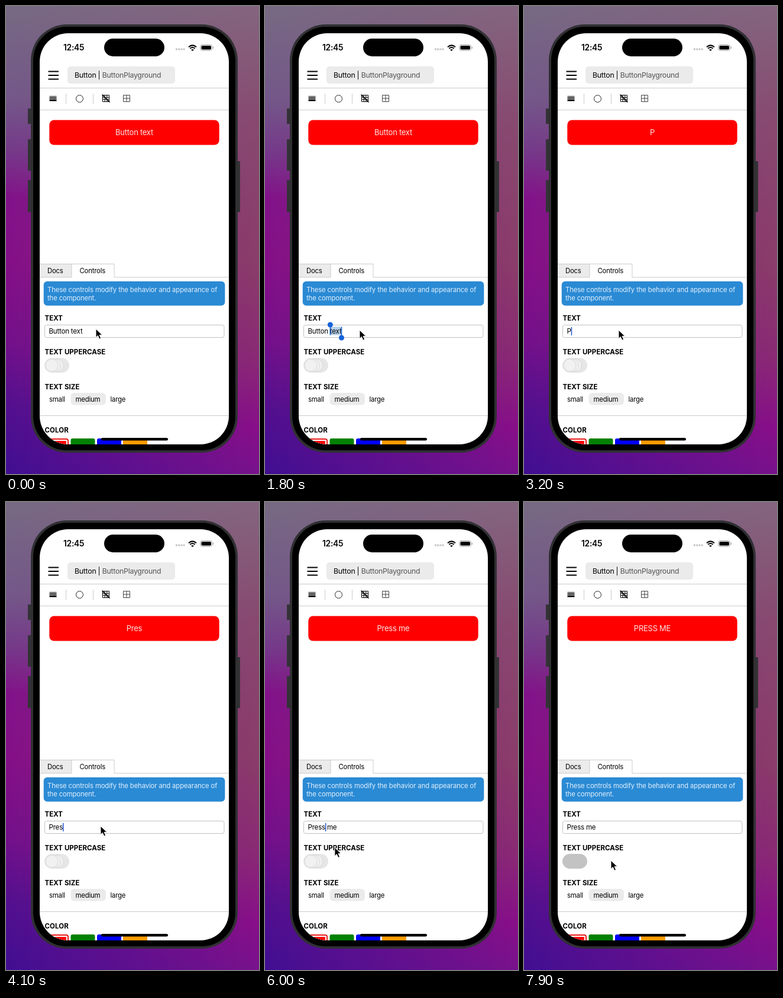
An HTML page for the animation above (8 s loop, 428 by 790 pixels).

```html
<!DOCTYPE html>
<html lang="en">
<head>
<meta charset="utf-8">
<title>Button playground</title>
<style>
  html, body { margin: 0; width: 100%; height: 100%; overflow: hidden; }
  svg { display: block; width: 428px; height: 790px; }
  text { font: 400 11.4px Inter, Roboto, sans-serif; letter-spacing: -.02em; white-space: pre; fill: #000; }
  .label { font-size: 11.5px; font-weight: 700; letter-spacing: .005em; }
  .rule { stroke: #cbcbcb; fill: none; }
  .grey { fill: #ebebeb; }
  .banner { font-size: 11.3px; letter-spacing: -.01em; fill: #e2f0fc; }
  #menu { filter: drop-shadow(0 2px 7px #0002); }
  #menu text { font-size: 12px; text-anchor: middle; }
</style>
</head>
<body>
<svg viewBox="0 0 428 790">
  <defs>
    <linearGradient id="left" x2="0" y2="1">
      <stop offset="0" stop-color="#776a83"/>
      <stop offset=".2" stop-color="#73588a"/>
      <stop offset=".31" stop-color="#75398b"/>
      <stop offset=".41" stop-color="#82128a"/>
      <stop offset=".55" stop-color="#850f88"/>
      <stop offset=".72" stop-color="#73108b"/>
      <stop offset=".86" stop-color="#52108f"/>
      <stop offset="1" stop-color="#410f92"/>
    </linearGradient>
    <linearGradient id="right" x2="0" y2="1">
      <stop offset="0" stop-color="#84657f"/>
      <stop offset=".25" stop-color="#88496f"/>
      <stop offset=".55" stop-color="#8a3d69"/>
      <stop offset=".75" stop-color="#8a2a74"/>
      <stop offset=".9" stop-color="#880f88"/>
      <stop offset="1" stop-color="#78128c"/>
    </linearGradient>
    <linearGradient id="fade"><stop stop-color="#000"/><stop offset="1" stop-color="#fff"/></linearGradient>
    <mask id="across"><rect width="428" height="790" fill="url(#fade)"/></mask>
    <linearGradient id="glass" x2="0" y2="1">
      <stop stop-color="#dbe6f0"/><stop offset=".4" stop-color="#e8ecf1"/><stop offset="1" stop-color="#f1f2f4"/>
    </linearGradient>
    <clipPath id="screen"><rect x="57" y="46" width="320" height="694" rx="48"/></clipPath>
  </defs>

  <rect width="428" height="790" fill="url(#left)"/>
  <rect width="428" height="790" fill="url(#right)" mask="url(#across)"/>

  <!-- phone -->
  <path d="M39.5 173v26M39.5 225v53M39.5 294v54M393.5 262v86" stroke="#333336" stroke-width="5"/>
  <rect x="42" y="31" width="350" height="723" rx="61" fill="#303033"/>
  <rect x="46" y="35" width="342" height="715" rx="57" fill="#000"/>

  <g clip-path="url(#screen)">
    <rect x="57" y="46" width="320" height="694" fill="#fff"/>

    <!-- status bar -->
    <text x="97" y="75" style="font-size:13.8px;font-weight:600">12:45</text>
    <rect x="166" y="55" width="102" height="30" rx="15"/>
    <path d="M287 73h15.500" stroke="#c4c4c4" stroke-width="3" stroke-dasharray="3 1.2"/>
    <path d="M309 69.200q6.500-5.600 13 0M311.300 71.800q4.200-3.500 8.400 0" fill="none" stroke="#000" stroke-width="2"/>
    <path d="M313 73.700q2.500-1.600 5 0l-2.500 2.300z"/>
    <rect x="329" y="65.500" width="19.500" height="9.500" rx="3" fill="#fff" stroke="#999"/>
    <rect x="330.500" y="67" width="16.500" height="6.500" rx="1.800"/>
    <path d="M350.500 68.500v3.500" stroke="#999"/>

    <!-- header -->
    <path d="M71.500 110.500h17.500M71.500 117h17.500M71.500 123.500h17.500" stroke="#000" stroke-width="2.200"/>
    <rect class="grey" x="104" y="102" width="182" height="29" rx="5"/>
    <text x="116" y="121" style="font-size:12.3px">Button | <tspan fill="#555">ButtonPlayground</tspan></text>
    <path class="rule" d="M57 138.500h320M57 175.500h320M101.500 148v17M147.500 148v17"/>

    <!-- toolbar -->
    <path d="M73.500 152h12v1h-12zM73.500 154.300h12v2h-12zM73.500 157.500h12v3h-12z"/>
    <g fill="none" stroke="#222">
      <circle cx="124.500" cy="156.500" r="6"/>
      <path d="M163.500 150.500h11v11h-11zM167.200 150.500v11M170.800 150.500v11M163.500 154.200h11M163.500 157.800h11" stroke="#000"/>
      <path d="M162.500 149.500l13 13" stroke="#000" stroke-width="1.400"/>
      <path d="M198.500 150.500h11v11h-11zM204 150.500v11M198.500 156h11" stroke="#444"/>
    </g>

    <!-- preview -->
    <rect x="73.300" y="192.400" width="287.400" height="42.200" rx="8" fill="#f00"/>
    <text id="preview" x="217" y="218" text-anchor="middle" style="font-size:13px;fill:#ffe3e3"></text>

    <!-- tabs -->
    <rect class="grey" x="57" y="435" width="54" height="23"/>
    <path class="rule" d="M57 435.500h126v22.500H377M57 458h54v-22.500"/>
    <text x="70" y="451">Docs</text>
    <text x="124.500" y="451">Controls</text>

    <rect x="63.700" y="464.700" width="306.700" height="41" rx="6" fill="#2a8ad4"/>
    <text class="banner" x="70" y="482.500">These controls modify the behavior and appearance of</text>
    <text class="banner" x="70" y="496.500">the component.</text>

    <!-- text control -->
    <text class="label" x="65.500" y="531">TEXT</text>
    <rect x="65.500" y="538.500" width="303.500" height="21" rx="3" fill="#fff" stroke="#c0c0c0"/>
    <rect id="range" y="541.500" height="14" fill="#b4cfea"/>
    <text id="field" x="72.500" y="553" style="font-size:11.6px"></text>
    <g id="grips" fill="#1762d8">
      <g id="grip1"><circle cy="538" r="4.500"/><rect x="-.8" y="538" width="1.600" height="17.500"/></g>
      <g id="grip2"><circle cy="560" r="4.500"/><rect x="-.8" y="541.500" width="1.600" height="18"/></g>
    </g>
    <rect id="caret" y="542" width="1.500" height="14" fill="#2458d8"/>

    <!-- toggle -->
    <text class="label" x="65.500" y="587.500">TEXT UPPERCASE</text>
    <rect id="track" x="65" y="594" width="42" height="25" rx="12.500"/>
    <g id="thumb" fill="#f1f1f1" stroke="#d8d8d8">
      <circle cx="87" cy="606.500" r="10.500"/>
      <circle cx="82" cy="606.500" r="10.500"/>
      <circle cx="77.500" cy="606.500" r="10.500"/>
    </g>

    <!-- size -->
    <text class="label" x="65.500" y="647">TEXT SIZE</text>
    <rect class="grey" x="109.500" y="653" width="59.500" height="20.500" rx="6"/>
    <text x="73" y="667.500">small</text>
    <text x="117.500" y="667.500">medium</text>
    <text x="176.500" y="667.500">large</text>
    <path class="rule" d="M57 691.500h320"/>

    <!-- color -->
    <text class="label" x="65.500" y="720">COLOR</text>
    <rect x="66" y="731" width="39" height="30" rx="3" fill="#fff" stroke="#e81818" stroke-width="2"/>
    <rect x="69" y="734" width="33" height="30" fill="#f00"/>
    <rect x="109.500" y="730" width="41" height="30" rx="3" fill="#008000"/>
    <rect x="154" y="730" width="41" height="30" rx="3" fill="#00f"/>
    <rect x="198" y="730" width="41" height="30" rx="3" fill="#ff9b00"/>
    <rect x="161" y="729" width="113" height="4.500" rx="2.200"/>

    <!-- edit menu -->
    <g id="menu">
      <path d="M82 498h240q10 0 10 10v13q0 10-10 10H129l-7 6-7-6H82q-10 0-10-10v-13q0-10 10-10z" fill="url(#glass)"/>
      <text x="95" y="518">Cut</text>
      <text x="145.500" y="518">Copy</text>
      <text x="202.500" y="518">Paste</text>
      <text x="268" y="518">Look Up</text>
      <path d="M316.500 509.500l4.500 4.300-4.500 4.300" fill="none" stroke="#000" stroke-width="1.700"/>
    </g>
  </g>

  <path id="cursor" d="M0 0v14.500l3.400-3.200 2.500 5.800 2.700-1.100-2.500-5.700h4.700z" stroke="#fff" stroke-linejoin="round"/>
</svg>

<script>
const LOOP = 8000;
const ui = {};
document.querySelectorAll("svg [id]").forEach(el => ui[el.id] = el);

const typed = [
  [0, "Button text"], [3000, "P"], [3600, "Pr"], [4000, "Pre"], [4100, "Pres"],
  [4200, "Press"], [4900, "Press "], [5000, "Press m"], [5100, "Press me"]
];
const path = [
  [0, 152, 545], [100, 152, 545], [800, 160, 547], [5500, 160, 547],
  [6400, 88, 609], [7250, 88, 609], [7800, 147, 605], [LOOP, 147, 605]
];
const FOCUS = 1000, WORD = 1500, ALL = 2100, TYPE = 3000, TAP = 7000;

const ramp = (t, a, b) => Math.min(1, Math.max(0, (t - a) / (b - a)));
const ease = k => k * k * (3 - 2 * k);
const show = (el, opacity) => el.setAttribute("opacity", +opacity);
const moveTo = (el, x, y = 0) => el.setAttribute("transform", `translate(${x} ${y})`);

function cursorAt(t) {
  const i = path.findIndex(p => p[0] > t);
  const [a, x0, y0] = path[i - 1], [b, x1, y1] = path[i];
  const k = ease(ramp(t, a, b));
  return [x0 + (x1 - x0) * k, y0 + (y1 - y0) * k];
}

// x position in the field after n characters
const textX = n => 72.5 + (n ? ui.field.getSubStringLength(0, n) : 0);

function drawField(t, text) {
  ui.field.textContent = text;
  const selecting = t >= WORD && t < TYPE;
  show(ui.range, selecting);
  show(ui.grips, selecting);
  const from = textX(t < ALL ? Math.min(7, text.length) : 0), to = textX(text.length);
  ui.range.setAttribute("x", from);
  ui.range.setAttribute("width", to - from);
  moveTo(ui.grip1, from + .5);
  moveTo(ui.grip2, to);

  const phase = (t + 100) % 1000;
  const blink = phase < 850 ? 1 - ramp(phase, 600, 800) : ramp(phase, 850, 1000);
  const focused = t >= FOCUS && t < TAP && !selecting;
  // the caret stays behind once the word is complete
  const at = t < TYPE ? text.length : Math.min(text.length, 5);
  ui.caret.setAttribute("x", textX(at));
  show(ui.caret, focused ? blink : 0);
}

function draw(t) {
  const text = typed.findLast(step => step[0] <= t)[1];
  drawField(t, text);
  ui.preview.textContent = t < TAP ? text : text.toUpperCase();
  show(ui.menu, ramp(t, 2250, 2450) * (1 - ramp(t, 2800, 3000)));

  const on = ease(ramp(t, TAP, TAP + 300));
  const shade = Math.round(230 - 35 * on);
  ui.track.setAttribute("fill", `rgb(${shade},${shade},${shade})`);
  moveTo(ui.thumb, 17 * on);
  show(ui.thumb, 1 - on);
  moveTo(ui.cursor, ...cursorAt(t));
}

const start = performance.now();
function frame() {
  draw((performance.now() - start) % LOOP);
  requestAnimationFrame(frame);
}
frame();
</script>
</body>
</html>
```
